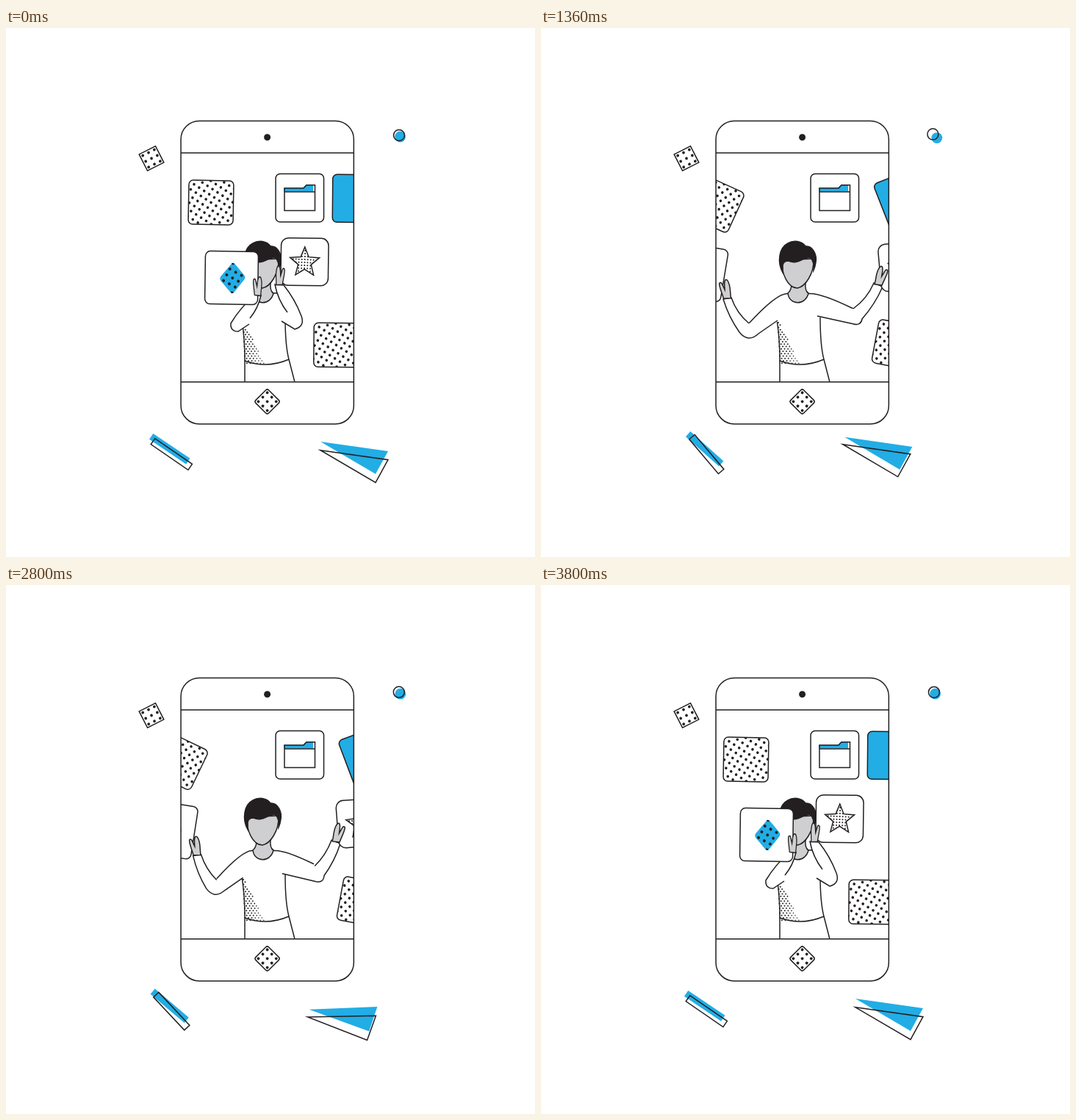
Animation, 720 px wide and 720 px high, one loop 3.84 s. Source, as an HTML page with a canvas:

```html
<!DOCTYPE html>
<html>
<head>
<meta charset="utf-8">
<style>
html, body { margin: 0; width: 720px; height: 720px; overflow: hidden; background: #fff; }
canvas { display: block; }
</style>
</head>
<body>
<canvas id="stage" width="720" height="720"></canvas>
<script>
const g = document.getElementById('stage').getContext('2d');
const INK = '#231f20', BLUE = '#22ade5', SKIN = '#cfcfd1', WHITE = '#fff';
const LOOP = 3840, SWIPE = 1080;

// Timing
const clamp = u => Math.min(1, Math.max(0, u));
const sine = u => (1 - Math.cos(Math.PI * clamp(u))) / 2;
const cubic = u => (u = clamp(u)) < .5 ? 4 * u ** 3 : 1 - 4 * (1 - u) ** 3;
const swipe = (t, open, close) => cubic((t - open) / SWIPE) - cubic((t - close) / SWIPE);
const mix = (a, b, p) => Array.isArray(a) ? a.map((v, i) => mix(v, b[i], p)) : a + (b - a) * p;

// Tiles slide from one [x, y, degrees] to another and back
const tiles = {
  spot: { from: [279, 237.5, 1], to: [234.2, 240, 26.5], open: 570, close: 2585 },
  blue: { from: [477, 232, .5], to: [494.1, 231.3, -21.5], open: 355, close: 2580 },
  low: { from: [449.5, 431.5, .5], to: [485.5, 431.2, 10.7], open: 437, close: 2630 },
  gem: { from: [307, 340, .8], to: [214, 332, 9.5], open: 330, close: 2515 },
  star: { from: [406.5, 318.3, .8], to: [493, 324.5, -5], open: 280, close: 2470 }
};
// Arm points: crease, inner cuff, outer cuff, elbow start, elbow end, armpit
const leftArm = {
  side: 1, shoulder: [336, 361.5], tuck: [333, 372], turn: [8, -2],
  from: [[332, 395], [347, 364], [338, 364], [306, 402], [316, 413], [331, 403]],
  to: [[283, 402], [259, 367], [248, 369], [270, 414], [296, 416], [322, 398]]
};
const rightArm = {
  side: -1, shoulder: [364, 361.5], tuck: [372, 362], turn: [-4, 8],
  from: [[383, 387], [366, 349], [378, 350], [402, 392], [393, 410], [375, 399]],
  to: [[425, 382], [453, 347], [465, 352], [437, 396], [426, 403], [376, 392]]
};

function paint(path, fill, stroke = INK) {
  if (fill) { g.fillStyle = fill; g.fill(path); }
  if (stroke) { g.strokeStyle = stroke; g.stroke(path); }
}
const shape = (d, fill, stroke) => paint(new Path2D(d), fill, stroke);

function box(w, h = w, r = 0) {
  const p = new Path2D();
  p.roundRect(-w / 2, -h / 2, w, h, r);
  return p;
}
function disc(x, y, r, fill, stroke = null) {
  const p = new Path2D();
  p.arc(x, y, r, 0, 7);
  paint(p, fill, stroke);
}
function at([x, y, deg], draw) {
  g.save();
  g.translate(x, y);
  g.rotate(deg * Math.PI / 180);
  draw();
  g.restore();
}
// Grid of (2n+1)² dots around the local origin
function dots(n, gap, r, deg = 0) {
  at([0, 0, deg], () => {
    for (let i = -n; i <= n; i++)
      for (let j = -n; j <= n; j++) disc(i * gap, j * gap, r, INK);
  });
}
function dotted(path, fill, stroke, ...grid) {
  paint(path, fill, null);
  g.save();
  g.clip(path);
  dots(...grid);
  g.restore();
  paint(path, null, stroke);
}

const gem = new Path2D('M-2 -19Q0 -22 3 -19L16 -4Q18 -1 16 2L2 20Q0 22 -3 19L-16 4Q-18 1 -16 -2Z');
const wedge = new Path2D('M-57.8 -11L35.1 -11L22.6 22Z');
const star = new Path2D();
for (let i = 0; i < 10; i++) {
  const a = i * Math.PI / 5 - Math.PI / 2, r = i % 2 ? 9.3 : 21;
  star.lineTo(r * Math.cos(a), r * Math.sin(a));
}
star.closePath();

const drawTile = {
  spot: () => dotted(box(61, 60, 6), WHITE, INK, 6, 8.2, 1.8, 32),
  low: () => drawTile.spot(),
  blue: () => paint(box(65, 65, 6), BLUE),
  gem() {
    paint(box(72, 72, 7), WHITE);
    g.translate(1.3, .3);
    dotted(gem, BLUE, null, 3, 9, 2, 28);
  },
  star() {
    paint(box(64.5, 64.5, 10), WHITE);
    g.translate(0, .8);
    dotted(star, WHITE, INK, 6, 4, 1, 2);
  }
};
function tile(name, t) {
  const { from, to, open, close } = tiles[name];
  at(mix(from, to, swipe(t, open, close)), drawTile[name]);
}

function folder() {
  at([399.8, 231.2, 0], () => paint(box(65.5, 65.5, 6), WHITE));
  shape('M378 217.5H404L408 213.5H418V222.5H378Z', BLUE, null);
  shape('M379 223V218H405L409 213.7H420.5V248.5H379V223H420.5');
}

function person() {
  shape('M321.5 400Q325 425 325 453V481M380 394Q380 432 385 451L393 482M325 453Q355 464 385 451');
  for (let row = 0; row < 18; row++) {
    const y = 401 + row * 3.25, end = 324 + (y - 400) * .5;
    for (let x = 323 + row * .15 + row % 2 * 2.3; x < end; x += 4.6)
      disc(x, y, 1.1 - (x - 323) / 70, INK);
  }
  shape('M341 348Q341 357 336 361C338 378 360 378 364 361Q359 358 360 347Z', SKIN);
  shape('M329 316C326 333 336 354 349 354C360 352 372 334 371 314Z', SKIN);
  shape('M329 333C321 318 324 299 336 293C344 288 355 290 360 297C370 296 376 309 374 319Q373 326 371 330Q372 318 367 313C356 311 350 323 337 317Q330 317 329 323Z', INK);
}

// Curve from a to b, bowed sideways by a share of its length
function bend(path, a, b, bow) {
  path.quadraticCurveTo((a[0] + b[0]) / 2 - (b[1] - a[1]) * bow * 2,
    (a[1] + b[1]) / 2 + (b[0] - a[0]) * bow * 2, ...b);
}
function drawArm({ side, shoulder, tuck, from, to }, p) {
  const [crease, inner, outer, elbow, elbowEnd, armpit] = mix(from, to, p);
  const [x, y] = shoulder, end = mix(tuck, to[0], p);
  shape(`M${x} ${y}Q${mix(x, end[0], .27)} ${y - 1.5} ${end}`);
  const sleeve = new Path2D();
  sleeve.moveTo(...crease);
  bend(sleeve, crease, inner, side * mix(.06, -.07, p));
  sleeve.lineTo(...outer);
  bend(sleeve, outer, elbow, side * .04);
  bend(sleeve, elbow, elbowEnd, side * .27);
  sleeve.lineTo(...armpit);
  paint(sleeve, WHITE);
}
function drawHand({ side, turn, from, to }, p) {
  const [, inner, outer] = mix(from, to, p);
  at([...mix(inner, outer, .5), mix(...turn, p)], () => {
    g.scale(side * mix(.85, 1, p), 1);
    shape('M-5 0C-7 -8 -11 -17 -10 -21Q-8 -23 -6.5 -20L-3 -12C-3 -16 -4 -22 -2 -25Q1 -27 3 -20C5 -14 4 -8 5 0Z', SKIN);
  });
}

function screen(t) {
  const left = swipe(t, tiles.gem.open, tiles.gem.close);
  const right = swipe(t, tiles.star.open, tiles.star.close);
  g.save();
  g.beginPath();
  g.rect(238, 170, 235.5, 312);
  g.clip();
  tile('spot', t);
  tile('low', t);
  tile('blue', t);
  folder();
  person();
  drawArm(leftArm, left);
  drawArm(rightArm, right);
  tile('gem', t);
  tile('star', t);
  drawHand(leftArm, left);
  drawHand(rightArm, right);
  g.restore();
}

function phone() {
  at([355.7, 332.7, 0], () => paint(box(235.3, 412.5, 25)));
  shape('M238 170H473.5M238 481.7H473.5');
  disc(355.6, 148.7, 4.5, INK);
  at([355.6, 508.5, 45], () => { paint(box(25, 25, 3)); dots(1, 8.6, 1.9); });
}

function floaters(t) {
  at([198, 177.5, -27], () => { paint(box(25)); dots(1, 8.8, 1.9); });

  const apart = 1 - Math.cos(Math.PI * t / 960) ** 4;
  disc(536.5 + 2.3 * apart, 148 + 1.6 * apart, 7.4, BLUE);
  disc(535 - 1.6 * apart, 146 - 1.4 * apart, 7.5, null, INK);

  const swing = sine(t / 1640) - sine((t - 2280) / 1560);
  at([222.7, 572.8, mix(34, 42.4, swing)], () => paint(box(60.5, 9.5), BLUE, null));
  at([225.3, 580.1, mix(34.5, 51, swing)], () => paint(box(61.5, 9.7)));

  // Drifts round three stops: x, y, degrees, then the outline's shift
  const start = [483.7, 582, 8, 0, 11.7, 0], high = [469, 576, 8.2, -2.5, 9.8, 0], low = [469, 587, -3.8, -2.5, 11.5, 1.5];
  const pose = t < 1360 ? mix(start, high, sine(t / 1360))
    : t < 2500 ? mix(high, low, sine((t - 1360) / 1140))
    : mix(low, start, sine((t - 2500) / (LOOP - 2500)));
  const [x, y, deg, dx, dy, twist] = pose;
  at([x, y, deg], () => paint(wedge, BLUE, null));
  at([x + dx, y + dy, deg + twist], () => paint(wedge));
}

function tick() {
  const t = Math.floor(performance.now() % LOOP / 40) * 40;
  g.fillStyle = WHITE;
  g.fillRect(0, 0, 720, 720);
  g.lineWidth = 1.5;
  screen(t);
  phone();
  floaters(t);
  requestAnimationFrame(tick);
}
tick();
</script>
</body>
</html>
```
